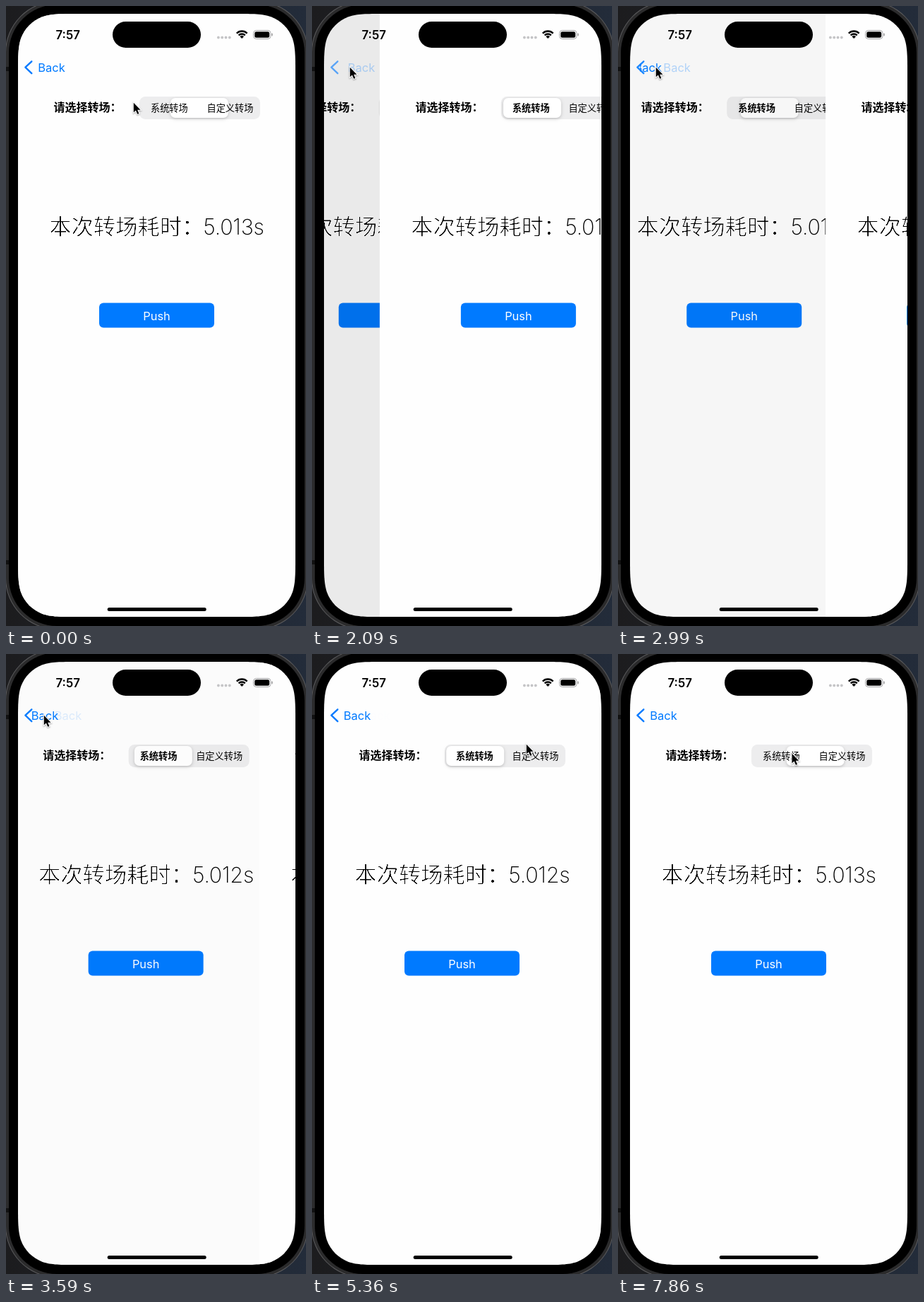
An HTML page with a canvas that plays this animation: 425x876 px, repeating every 8000 ms.

```html
<!DOCTYPE html>
<html lang="zh-CN">
<head>
<meta charset="utf-8">
<title>转场</title>
<style>
  html, body { margin: 0; width: 100%; height: 100%; overflow: hidden; background: #000; }
  canvas { display: block; }
</style>
</head>
<body>
<canvas id="stage" width="425" height="876"></canvas>
<script>
const ctx = document.getElementById('stage').getContext('2d');
const LOOP = 8000, STEPS = 54, STEP_MS = 149.4;
const POP_START = 1639, POP_END = 6650, SELECT_CUSTOM = 7065, SELECT_SYSTEM = -773;
const SCREEN = { x: 17, y: 11, w: 393, h: 852, r: 55 };
const LATIN = 'Inter, sans-serif';
const CJK = '"Noto Sans CJK SC", "Noto Sans CJK", sans-serif';
const BLUE = '#007aff', PAGE = '#fefefe';

const CURSOR_PATH = [
  [0, 180, 136], [1150, 53, 86], [4550, 53, 86], [5378, 303, 127],
  [5700, 320, 146], [7100, 320, 146], [8060, 241, 139.6]
];

const clamp = v => Math.max(0, Math.min(1, v));
const lerp = (a, b, u) => a + (b - a) * u;
const smooth = u => u * u * (3 - 2 * u);

// Critically damped spring: the part of the way still to go.
function remaining(ms, rate) {
  const x = Math.max(0, ms / 1000 * rate);
  return (1 + x) * Math.exp(-x);
}

function box(x, y, w, h, r, color) {
  ctx.beginPath();
  ctx.roundRect(x, y, w, h, r);
  if (color) {
    ctx.fillStyle = color;
    ctx.fill();
  }
}

// Rectangle whose corners ease into the sides (continuous curvature).
function smoothBox({ x, y, w, h, r }) {
  const path = new Path2D();
  for (const [cx, cy, sx, sy, flip] of [
    [x, y, 1, 1, false], [x + w, y, -1, 1, true],
    [x + w, y + h, -1, -1, false], [x, y + h, 1, -1, true]
  ]) {
    const at = (u, v) => [cx + sx * r * (flip ? v : u), cy + sy * r * (flip ? u : v)];
    path.lineTo(...at(0, 1.528));
    path.bezierCurveTo(...at(0, 1.088), ...at(0, .868), ...at(.075, .631));
    path.bezierCurveTo(...at(.169, .373), ...at(.373, .169), ...at(.631, .075));
    path.bezierCurveTo(...at(.868, 0), ...at(1.088, 0), ...at(1.528, 0));
  }
  path.closePath();
  return path;
}
const screenPath = smoothBox(SCREEN);

function text(str, x, y, font, color = '#000', spacing = 0) {
  ctx.font = font;
  ctx.letterSpacing = spacing + 'px';
  ctx.fillStyle = color;
  ctx.fillText(str, x, y);
}

// Regular-weight glyphs with their outline shaved off, for a light look.
function makeLightText(str, font, w, h, baseline, shave) {
  const scale = 3, canvas = document.createElement('canvas');
  canvas.width = w * scale;
  canvas.height = h * scale;
  const c = canvas.getContext('2d');
  c.scale(scale, scale);
  c.font = font;
  c.fillText(str, 0, baseline);
  c.globalCompositeOperation = 'destination-out';
  c.lineWidth = shave;
  c.lineJoin = 'round';
  c.strokeText(str, 0, baseline);
  return canvas;
}
const title = makeLightText('本次转场耗时：', `400 31.3px ${CJK}`, 222, 42, 32.3, .95);

function line(points, color, width) {
  ctx.beginPath();
  points.forEach(([x, y]) => ctx.lineTo(x, y));
  ctx.strokeStyle = color;
  ctx.lineWidth = width;
  ctx.lineCap = ctx.lineJoin = 'round';
  ctx.stroke();
}

function drawPhone() {
  const backdrop = ctx.createLinearGradient(0, 0, 425, 0);
  backdrop.addColorStop(0, '#1c1c1e');
  backdrop.addColorStop(1, '#232c3a');
  ctx.fillStyle = backdrop;
  ctx.fillRect(0, 0, 425, 876);
  box(-1, -7, 429, 888, 73, '#5a5a5c');
  box(0, -6, 427, 886, 72, '#2b2b2c');
  ctx.fillStyle = '#111';
  ctx.fillRect(0, 86, 4, 6);
  ctx.fillRect(0, 783, 4, 6);
  box(4, -2, 419, 878, 68, '#000');
}

// selected: 0 = left segment, 1 = right segment
function drawSegments(selected) {
  const weight = on => on > .65 ? 600 : on > .35 ? 500 : 400;
  box(189, 128, 171, 32, 8.5, '#ededee');
  ctx.save();
  ctx.shadowColor = 'rgba(0,0,0,.2)';
  ctx.shadowBlur = 4;
  ctx.shadowOffsetY = 1.5;
  box(191 + 85 * selected, 130, 82, 28, 7, '#fff');
  ctx.restore();
  text('系统转场', 205, 149, `${weight(1 - selected)} 13.2px ${CJK}`);
  text('自定义转场', 284.5, 149, `${weight(selected)} 13.2px ${CJK}`);
}

function drawPage(offset, selected, seconds) {
  ctx.save();
  ctx.translate(offset, 0);
  ctx.fillStyle = PAGE;
  ctx.fillRect(SCREEN.x, SCREEN.y, SCREEN.w, SCREEN.h);
  text('请选择转场：', 67.5, 149, `700 16px ${CJK}`);
  drawSegments(selected);
  ctx.drawImage(title, 61.3, 291, 222, 42);
  text(seconds + 's', 279.6, 323, `200 30.4px ${LATIN}`, '#000', -0.2);
  box(132, 419.6, 163, 35, 6, BLUE);
  ctx.textAlign = 'center';
  text('Push', 213.5, 443.5, `400 16.4px ${LATIN}`, '#fff');
  ctx.textAlign = 'left';
  ctx.restore();
}

function drawBackLabel(offset, alpha) {
  ctx.globalAlpha = alpha;
  text('Back', 45.3 + offset, 93, `400 16.5px ${LATIN}`, BLUE);
  ctx.globalAlpha = 1;
}

function drawNavBar(t, p) {
  const press = clamp((t - 1330) / 280);
  const popping = t >= POP_START && t < POP_END;
  if (popping) {
    ctx.save();
    ctx.beginPath();
    ctx.rect(31, 70, 200, 34);
    ctx.clip();
    drawBackLabel(-74 * (1 - p), clamp(p * 1.6));
    ctx.restore();
    drawBackLabel(27 * p, Math.min(.28, 1 - p));
  } else {
    drawBackLabel(0, t < POP_START ? lerp(1, .28, press) : 1);
  }
  ctx.globalAlpha = t < POP_START ? lerp(1, .5, press) : clamp(.5 + .55 * p);
  line([[36.3, 78.3], [27.4, 86.7], [36.3, 95.2]], BLUE, 2.4);
  ctx.globalAlpha = 1;
}

function drawStatusBar() {
  text('7:57', 70.5, 46.5, `600 16.8px ${LATIN}`);
  box(151, 22, 125, 37, 18.5, '#000');
  for (let i = 0; i < 4; i++) box(299 + 5.3 * i, 42.6, 3.8, 3.8, 1.9, '#c5c5c7');

  const arc = r => {
    ctx.beginPath();
    ctx.arc(334.2, 46, r, -Math.PI * .75, -Math.PI * .25);
  };
  ctx.strokeStyle = ctx.fillStyle = '#000';
  ctx.lineCap = 'butt';
  ctx.lineWidth = 2.3;
  [6.5, 10.5].forEach(r => { arc(r); ctx.stroke(); });
  arc(3.9);
  ctx.lineTo(334.2, 46);
  ctx.fill();

  box(350.5, 34.5, 24.5, 12, 4);
  ctx.strokeStyle = '#a2a2a4';
  ctx.lineWidth = 1;
  ctx.stroke();
  box(352.2, 36.2, 21, 8.6, 2.5, '#000');
  box(376.3, 38.5, 1.5, 4, .8, '#a2a2a4');
  box(143.7, 850, 140, 5, 2.5, '#000');
}

function drawCursor(t) {
  const i = CURSOR_PATH.findLastIndex(k => k[0] <= t);
  const from = CURSOR_PATH[i], to = CURSOR_PATH[i + 1] || from;
  const u = to === from ? 0 : smooth((t - from[0]) / (to[0] - from[0]));
  ctx.save();
  ctx.translate(lerp(from[1], to[1], u) + .8, lerp(from[2], to[2], u) + .8);
  ctx.shadowColor = 'rgba(0,0,0,.35)';
  ctx.shadowBlur = 2;
  ctx.shadowOffsetY = 1;
  const arrow = new Path2D('M0 0V13.5L3.1 10.7L5.4 16L7.6 15.1L5.4 9.9H9.7Z');
  ctx.strokeStyle = '#fff';
  ctx.lineWidth = 2;
  ctx.lineJoin = 'miter';
  ctx.stroke(arrow);
  ctx.shadowColor = 'transparent';
  ctx.fillStyle = '#000';
  ctx.fill(arrow);
  ctx.restore();
}

function render(t) {
  const p = t >= POP_END ? 1 : 1 - remaining(t - POP_START, 1.826);
  const lowerSelected = t < SELECT_CUSTOM
    ? remaining(t - POP_START, 2.2)
    : 1 - remaining(t - SELECT_CUSTOM, 2.2);

  drawPhone();
  ctx.save();
  ctx.clip(screenPath);
  drawPage(-.3 * SCREEN.w * (1 - p), lowerSelected, t < POP_END ? '5.012' : '5.013');
  ctx.fillStyle = `rgba(0,0,0,${.1 * (1 - p)})`;
  ctx.fillRect(SCREEN.x, SCREEN.y, SCREEN.w, SCREEN.h);
  if (t < POP_END) drawPage(SCREEN.w * p, remaining(t - SELECT_SYSTEM, 2.2), '5.013');
  drawNavBar(t, p);
  drawStatusBar();
  ctx.restore();
  drawCursor(t);
}

function frame() {
  const step = Math.floor(performance.now() % LOOP * STEPS / LOOP);
  render(step * STEP_MS);
  requestAnimationFrame(frame);
}
frame();
</script>
</body>
</html>
```
